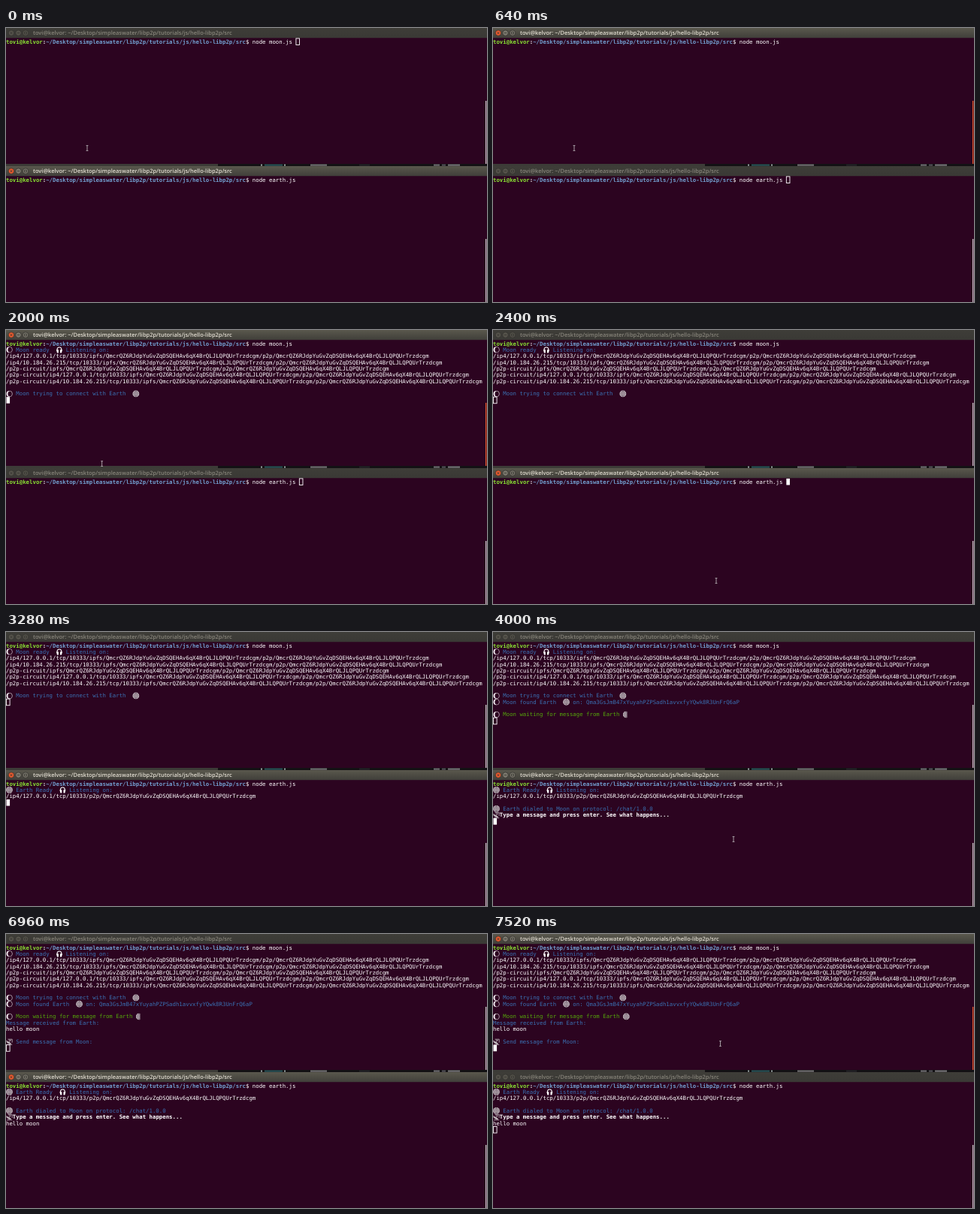
These frames come from a looping animation (640x365 px, 8 s). An HTML page:

```html
<!DOCTYPE html>
<html lang="en">
<head>
<meta charset="utf-8">
<title>Two terminals chatting</title>
<style>
  html, body { margin: 0; width: 100%; height: 100%; overflow: hidden; background: #2c0420; }
  svg { display: block; }
  text { white-space: pre; text-rendering: geometricPrecision; fill: #fff; }
  .line { font: 7.36px "DejaVu Sans Mono", monospace; }
  .bold { font-weight: bold; }
  .user { font-weight: bold; fill: #8ae234; }
  .path { font-weight: bold; fill: #729fcf; }
  .blue { fill: #3a70b2; }
  .green { fill: #55a60b; }
  .title { font: 600 7.46px "Open Sans", sans-serif; fill: #88857b; }
  .bar { fill: url(#barOff); }
  .button { fill: #55534b; stroke: #34332f; stroke-width: .8; }
  .sign { fill: none; stroke: #34332f; stroke-width: .8; }
  .thumb { fill: #d3cdd0; }
  .active .title { fill: #e4dfd3; }
  .active .bar { fill: url(#barOn); }
  .active .button { fill: #7b786d; }
  .active .close { fill: #ea5b2f; }
  .active .hot { fill: #e95a2c; }
  .fill { fill: #fff; }
  .box { fill: none; stroke: #fff; stroke-width: .9; }
  .off { display: none; }
</style>
</head>
<body>
<svg id="stage" width="640" height="365" viewBox="0 0 640 365">
  <defs>
    <linearGradient id="barOn" x2="0" y2="1">
      <stop stop-color="#5a584d"/><stop offset="1" stop-color="#403f3a"/>
    </linearGradient>
    <linearGradient id="barOff" x2="0" y2="1">
      <stop stop-color="#3e3d38"/><stop offset="1" stop-color="#3a3935"/>
    </linearGradient>
    <clipPath id="half"><rect width="5.6" height="9"/></clipPath>
    <g id="moon">
      <circle cx="4.5" cy="4.2" r="4" fill="#f4eef2"/>
      <ellipse cx="5.2" cy="4.2" rx="2.7" ry="3.5" fill="#2c0420"/>
    </g>
    <g id="globe">
      <circle cx="4.5" cy="4.2" r="4.4" fill="#c9c1c6"/>
      <path d="M.3 4.2h8.4M1 2h7M1 6.4h7M4.5 0v8.4M4.5 0q-4.6 4.2 0 8.4q4.6-4.2 0-8.4" fill="none" stroke="#5d4556" stroke-width=".5"/>
    </g>
    <g id="phones">
      <path d="M1.6 5.5V4a2.9 3.2 0 0 1 5.8 0V5.5" fill="none" stroke="#fff" stroke-width="1.1"/>
      <path d="M.5 4.2h2.9v4.2H1.5zM5.6 4.2h2.9L7.5 8.4H5.6z" fill="#fff"/>
    </g>
    <g id="dish" fill="none" stroke="#c4bcc1" stroke-width=".8">
      <path d="M.6 3Q1.2 7.4 6.8 7zM1.2 8.2h7M3.8 5L6.4 2.6M2.6 1h5.6v4.4M3.6 2.4h3"/>
      <path d="M1.4 4.2L6 7" stroke-width="1.8"/>
    </g>
  </defs>
</svg>
<script>
const LOOP = 8000, TICK = 80, COL = 4.43, ROW = 8.36;
const stage = document.getElementById('stage');

function add(parent, tag, attrs, content) {
  const node = document.createElementNS('http://www.w3.org/2000/svg', tag);
  for (const key in attrs) node.setAttribute(key, attrs[key]);
  if (content) node.textContent = content;
  return parent.appendChild(node);
}
const rect = (parent, x, y, width, height, attrs) =>
  add(parent, 'rect', { x, y, width, height, ...attrs });

const USER = 'tovi@kelvor';
const DIR = '~/Desktop/simpleaswater/libp2p/tutorials/js/hello-libp2p/src';
const ID = 'QmcrQZ6RJdpYuGvZqDSQEHAv6qX4BrQLJLQPQUrTrzdcgm';
const PEER = 'Qma3GsJmB47xYuyahPZPSadh1avvxfyYQwk8R3UnFrQ6aP';
const IDS = `/ipfs/${ID}/p2p/${ID}`;
const MESSAGE = 'hello moon';
const CLICK_DOWN = 2320, CLICK_UP = 7440;
const timed = [];

function makeWindow(top, height, hot) {
  const g = add(stage, 'g', { transform: `translate(0 ${top})` });
  rect(g, 0, 0, 640, height, { fill: '#2c0420' });
  rect(g, 0, 0, 640, 13.2, { class: 'bar' });
  [7, 16.5, 26].forEach((cx, i) =>
    add(g, 'circle', { cx, cy: 6.6, r: 3.8, class: i ? 'button' : 'button close' }));
  add(g, 'path', { class: 'sign', d: 'M5.6 5.2l2.8 2.8m0-2.8l-2.8 2.8M14.8 6.6h3.4M24.5 5.3h3v2.6h-3z' });
  add(g, 'text', { x: 36, y: 9.4, class: 'title' }, `${USER}: ${DIR}`);
  rect(g, 638, 97, 1.3, height - 97, { class: hot ? 'thumb hot' : 'thumb' });
  return { g, screen: add(g, 'g', { transform: 'translate(0 13.8)' }) };
}

// Each part is [column, class, text] or [column, 'icon', symbol].
function print(win, row, from, ...parts) {
  const g = add(win.screen, 'g', { transform: `translate(0 ${row * ROW})` });
  for (const [col, kind, value] of parts) {
    if (kind === 'icon') add(g, 'use', { href: '#' + value, transform: `translate(${col * COL} 0)` });
    else add(g, 'text', { x: col * COL, y: 6.7, class: 'line ' + kind }, value);
  }
  timed.push([g, from]);
  return g;
}
const prompt = (win, command) => print(win, 0, 0,
  [0, 'user', USER], [11, 'bold', ':'], [12, 'path', DIR], [72, '', '$ ' + command]);

// Desktop strip between the windows
rect(stage, 0, 180, 640, 6, { fill: '#3c3b37' });
rect(stage, 282, 181, 358, 3, { fill: '#131114' });
[[339, 2, '#9aa5a5'], [344, 24, '#2b565b'], [370, 2, '#9aa5a5'], [405, 22, '#777577'],
 [470, 14, '#252328'], [569, 8, '#737175'], [580, 5, '#55535a'], [588, 16, '#7b797c']]
  .forEach(([x, w, fill]) => rect(stage, x, 181.6, w, 2, { fill }));

const moon = makeWindow(0, 181, true);
const earth = makeWindow(184, 181, false);

prompt(moon, 'node moon.js');
print(moon, 1, 1840, [0, 'icon', 'moon'], [3, 'blue', 'Moon ready'],
  [15, 'icon', 'phones'], [18, 'blue', 'Listening on:']);
['/ip4/127.0.0.1/tcp/10333', '/ip4/10.184.26.215/tcp/10333', '/p2p-circuit',
 '/p2p-circuit/ip4/127.0.0.1/tcp/10333', '/p2p-circuit/ip4/10.184.26.215/tcp/10333']
  .forEach((address, i) => print(moon, 2 + i, 1840, [0, '', address + IDS]));
print(moon, 8, 1920, [0, 'icon', 'moon'],
  [3, 'blue', 'Moon trying to connect with Earth'], [38, 'icon', 'globe']);
print(moon, 9, 3440, [0, 'icon', 'moon'], [3, 'blue', 'Moon found Earth'],
  [21, 'icon', 'globe'], [24, 'blue', 'on: ' + PEER]);
const cutGlobe = print(moon, 11, 3520, [0, 'icon', 'moon'],
  [3, 'green', 'Moon waiting for message from Earth'], [39, 'icon', 'globe']).lastChild;
print(moon, 12, 6560, [0, 'blue', 'Message received from Earth:']);
print(moon, 13, 6560, [0, '', MESSAGE]);
print(moon, 15, 6560, [0, 'icon', 'dish'], [3, 'blue', 'Send message from Moon:']);

prompt(earth, 'node earth.js');
print(earth, 1, 3280, [0, 'icon', 'globe'], [3, 'blue', 'Earth Ready'],
  [16, 'icon', 'phones'], [19, 'blue', 'Listening on:']);
print(earth, 2, 3280, [0, '', '/ip4/127.0.0.1/tcp/10333/p2p/' + ID]);
print(earth, 4, 3360, [0, 'icon', 'globe'],
  [3, 'blue', 'Earth dialed to Moon on protocol: /chat/1.0.0']);
print(earth, 5, 3360, [0, 'icon', 'dish'],
  [2, 'bold', 'Type a message and press enter. See what happens...']);
const typed = print(earth, 6, 4800, [0, '', '']).firstChild;

// Cursor states: [time, row, column, look]
moon.states = [[0, 0, 87, 'box'], [80, 0, 87, 'fill'], [640, 0, 87, 'off'], [1360, 1, 0, 'fill'],
  [1840, 7, 0, 'fill'], [1920, 9, 0, 'fill'], [CLICK_DOWN, 9, 0, 'box'], [3440, 10, 0, 'box'],
  [3520, 12, 0, 'box'], [6560, 16, 0, 'box'], [CLICK_UP, 16, 0, 'fill']];
earth.states = [[0, 0, 88, 'off'], [80, 0, 88, 'box'], [CLICK_DOWN, 0, 88, 'fill'],
  [2880, 1, 0, 'fill'], [3280, 3, 0, 'fill'], [3360, 6, 0, 'fill'], [3440, 6, 0, 'off'],
  [4000, 6, 0, 'fill'], [4480, 6, 0, 'off'], [4800, 6, 0, 'fill'], [6560, 7, 0, 'fill'],
  [6960, 7, 0, 'off'], [CLICK_UP, 7, 0, 'box']];
for (const win of [moon, earth]) win.cursor = rect(win.screen, 0, 0, 4.6, 8.6);

// Pointer trips: shown from, moves from, arrives, hidden at, start, end
const trips = [
  [0, 1920, 2320, 1040, [108, 160], [108, 160]],
  [1920, 1920, 2320, 2880, [108, 160], [297, 334]],
  [3600, 3600, 3840, 4640, [297, 334], [320, 276]],
  [7120, 7120, 7440, LOOP, [320, 276], [302.5, 146]]
];
const pointer = add(stage, 'path', {
  d: 'M-1.4-3.4h2.8M0-3.4v6.8M-1.4 3.4h2.8', fill: 'none', stroke: '#b4adb1', 'stroke-width': .9
});

function drawCursor(win, t, chars) {
  const [, row, col, look] = win.states.findLast(state => state[0] <= t);
  const shift = win === earth && row === 6 ? chars : 0;
  win.cursor.setAttribute('class', look);
  win.cursor.setAttribute('x', (col + shift) * COL + .5);
  win.cursor.setAttribute('y', row * ROW + .1);
}

function drawPointer(t) {
  const trip = trips.find(([shown, , , hidden]) => t >= shown && t < hidden);
  pointer.style.display = trip ? '' : 'none';
  if (!trip) return;
  const [, start, end, , a, b] = trip;
  const p = Math.min(1, Math.max(0, (t - start) / (end - start)));
  const ease = p * p * (3 - 2 * p);
  const [x, y] = a.map((v, i) => v + (b[i] - v) * ease);
  pointer.setAttribute('transform', `translate(${x} ${y})`);
}

function draw(t) {
  for (const [node, from] of timed) node.style.display = t >= from ? '' : 'none';
  const moonActive = t >= 80 && t < CLICK_DOWN || t >= CLICK_UP;
  moon.g.classList.toggle('active', moonActive);
  earth.g.classList.toggle('active', !moonActive);
  cutGlobe.setAttribute('clip-path', t < CLICK_UP ? 'url(#half)' : 'none');
  const chars = Math.min(MESSAGE.length, Math.max(0, Math.floor((t - 4640) / 160)));
  typed.textContent = MESSAGE.slice(0, chars);
  drawCursor(moon, t, chars);
  drawCursor(earth, t, chars);
  drawPointer(t);
}

const begin = performance.now();
function tick() {
  const t = (performance.now() - begin) % LOOP;
  draw(Math.floor(t / TICK) * TICK);
  requestAnimationFrame(tick);
}
tick();
</script>
</body>
</html>
```
